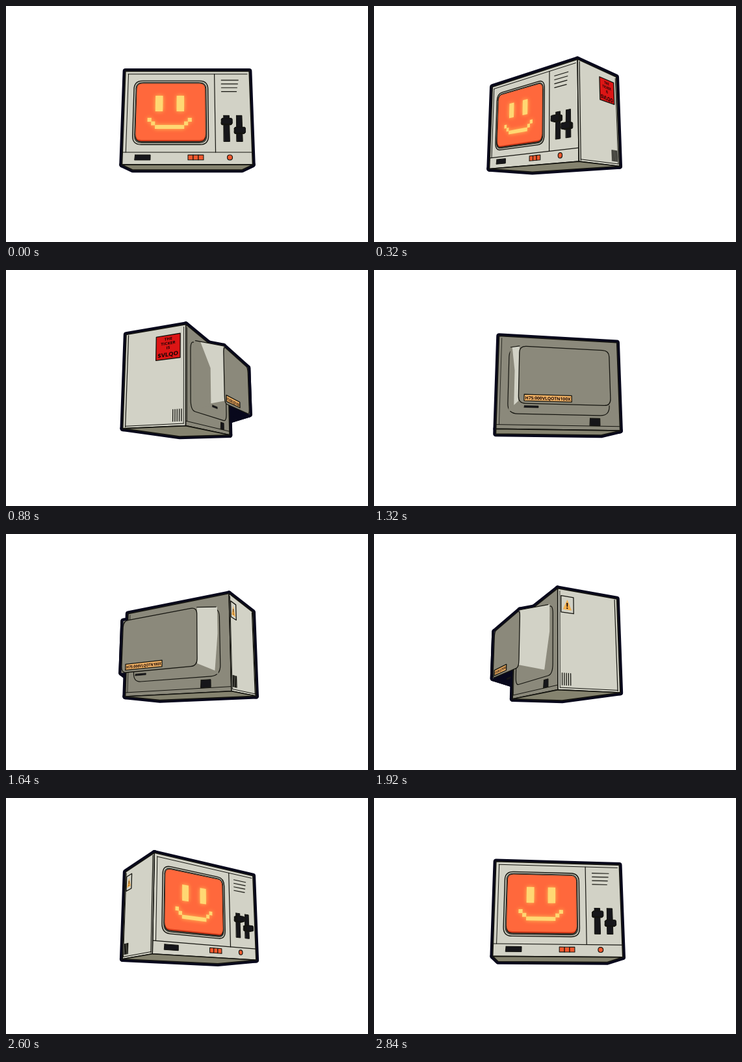
Write an HTML page with a canvas that moves like this. It is 557 by 363 pixels and loops after 2880 ms.

```html
<!DOCTYPE html>
<html lang="en">
<head>
<meta charset="utf-8">
<title>Turning monitor</title>
<style>
html, body { margin: 0; width: 100%; height: 100%; overflow: hidden; background: #fff; }
canvas { display: block; }
</style>
</head>
<body>
<canvas id="stage" width="557" height="363"></canvas>
<script>
const ctx = document.getElementById('stage').getContext('2d');
const LOOP = 2880, STEP = 40;
const INK = '#08081c', LINE = '#14140f', BLACK = '#16161a';
const LIGHT = '#d2d2c6', DARK = '#8b897b', UNDER = '#85836f';
const ORANGE = '#ff683c', GLOW = '#ffd873', KEY = '#f4592f';

// Camera looking up at the body; sizes in stage pixels at the turning axis
const CX = 279, CY = 182.5, D = 540, SP = 0.2, CP = Math.sqrt(1 - SP * SP);
const W = 88, H = 66.3, FRONT = 55, BACK = -38, TAIL = -80;

let sin = 0, cos = 1;

// One full turn, running slightly ahead halfway round
function setTurn(part) {
  const yaw = 2 * Math.PI * part + 0.096 * Math.sin(Math.PI * part);
  sin = Math.sin(yaw);
  cos = Math.cos(yaw);
}

function project([x, y, z]) {
  const depth = x * sin + z * cos;
  const k = D / (D - depth * CP + y * SP);
  return [CX + (x * cos - z * sin) * k, CY - (y * CP + depth * SP) * k];
}

// Flat coordinates on each side: u to the right, v up
const onFront = (u, v) => [u, v, FRONT];
const onRight = (u, v) => [W, v, -u];
const onLeft = (u, v) => [-W, v, u];
const onBack = (u, v) => [-u, v, BACK];
const onTail = (u, v) => [-u, v, TAIL];
const onSlope = (u, v) => [-u, v, -60];
const onKnob = out => (u, v) => [u, v, FRONT + out];

const mix = (p, q, t) => p.map((n, i) => n + (q[i] - n) * t);
const box = (at, l, r, top, low) => [at(l, top), at(r, top), at(r, low), at(l, low)];
const rect = (at, u, v, w, h) => box(at, u - w / 2, u + w / 2, v + h / 2, v - h / 2);

// Corners run clockwise as seen from outside
const body = {
  front: box(onFront, -W, W, H, -H),
  right: box(onRight, -FRONT, -BACK, H, -H),
  back: box(onBack, -W, W, H, -H),
  left: box(onLeft, BACK, FRONT, H, -H),
  under: box((x, z) => [x, -H, z], -W, W, FRONT, BACK)
};
const base = box(onBack, -73, 73, 50, -45);
const tail = box(onTail, -61, 61, 39, -37);

// A side of the hump spans two neighbouring corners, from base (0) to tail (1)
const slope = (i, j) => (u, v) => mix(mix(base[i], tail[i], u), mix(base[j], tail[j], u), v);
const humpRight = slope(0, 3), humpLeft = slope(1, 2), humpUnder = slope(3, 2);
const hump = [
  box(humpRight, 0, 1, 0, 1),
  box(humpLeft, 1, 0, 0, 1),
  box((u, v) => humpUnder(v, u), 1, 0, 0, 1).reverse()
];

function facing(poly) {
  const [a, b, c] = poly.map(project);
  return (b[0] - a[0]) * (c[1] - a[1]) - (b[1] - a[1]) * (c[0] - a[0]) > 0;
}

// Corners are rounded in model space, so that they shorten with the turn
function trace(poly, r) {
  ctx.beginPath();
  poly.forEach((p, i) => {
    const toward = q => project(mix(p, q, r / Math.hypot(...q.map((n, j) => n - p[j]))));
    if (!r) return ctx.lineTo(...project(p));
    ctx.lineTo(...toward(poly.at(i - 1)));
    ctx.quadraticCurveTo(...project(p), ...toward(poly[(i + 1) % poly.length]));
  });
  ctx.closePath();
}

function shape(poly, fill, width = 0, r = 0, stroke = LINE) {
  trace(poly, r);
  ctx.fillStyle = fill;
  ctx.fill();
  if (!width) return;
  ctx.strokeStyle = stroke;
  ctx.lineWidth = width;
  ctx.stroke();
}

function line(p, q, width = 1.2) {
  ctx.beginPath();
  ctx.moveTo(...project(p));
  ctx.lineTo(...project(q));
  ctx.strokeStyle = LINE;
  ctx.lineWidth = width;
  ctx.stroke();
}

// Draws flat artwork of w by h units on a projected rectangle
function decal(poly, w, h, draw) {
  const [o, x, , y] = poly.map(project);
  ctx.save();
  ctx.transform((x[0] - o[0]) / w, (x[1] - o[1]) / w, (y[0] - o[0]) / h, (y[1] - o[1]) / h, o[0], o[1]);
  ctx.textAlign = 'center';
  draw();
  ctx.restore();
}

function write(text, x, y, size) {
  ctx.fillStyle = '#140505';
  ctx.font = `bold ${size}px "Open Sans", sans-serif`;
  ctx.fillText(text, x, y);
}

function drawSmile() {
  const dot = (u, v, w, h) => shape(rect(onFront, u - 24.5, v, w, h), GLOW);
  ctx.save();
  ctx.shadowColor = '#ffc45a';
  ctx.shadowBlur = 6;
  dot(0, -14.4, 40.4, 5.5);
  for (const side of [-1, 1]) {
    dot(side * 14.8, 19, 10.4, 22.5);
    for (const i of [0, 1]) dot(side * (22.8 + 5.1 * i), -9.5 + 5.2 * i, 5.5, 5.5);
  }
  ctx.restore();
}

function drawScreen() {
  const ring = (inset, fill, width, lift = 0) =>
    shape(box(onFront, -75 + inset, 29 - inset, 52 - inset, -39 + inset + lift), fill, width, 12 - inset);
  ring(0, '#c3c3b6', 1.4);
  ring(2.5, '#96958a', 1);
  ring(4, '#d43c1c', 1.4);
  ring(4, ORANGE, 0, 2.5);
  drawSmile();
}

function drawFront() {
  line(onFront(38.4, 62), onFront(38.4, -49.5));
  line(onFront(-W, -49.5), onFront(W, -49.5));
  line(onFront(-83.5, 62), onFront(-83.5, -49.5), 1);
  line(onFront(-84, 62), onFront(W - 3, 62), 1);
  drawScreen();
  for (let i = 0; i < 4; i++) line(onFront(48, 53 - 5.6 * i), onFront(72 - i, 53 - 5.6 * i));
  shape(rect(onFront, -60.6, -56.5, 21, 7), BLACK, 1);
  for (let i = 0; i < 3; i++) shape(rect(onFront, 4.4 + 7 * i, -56.5, 7, 6.8), KEY, 1.1);
  shape(rect(onFront, 57.6, -56.5, 7, 7), KEY, 1.2, 3.5);
  for (let i = 0; i < 2; i++) {
    shape(rect(onFront, 54 + 17.6 * i, -16.5, 8, 36.5), BLACK, 1);
    for (let out = 0; out <= 6; out += 2)
      shape(rect(onKnob(out), 54 + 17.6 * i, -7.5 - 12.4 * i, 14.6, 8), BLACK, 1, 1.5);
  }
}

// Bevel lines and vents; dir points from the front edge to the back edge
function drawSide(at, dir) {
  const edge = -dir * (FRONT - 4), rear = -dir * (BACK + 3);
  line(at(edge, H - 2), at(edge, 2 - H));
  line(at(edge, 3 - H), at(rear, 3 - H), 1);
  line(at(rear, H - 3), at(rear, 3 - H), 0.9);
  for (let i = 0; i < 5; i++) line(at(dir * (20 + 3 * i), -45), at(dir * (20 + 3 * i), -60), 1.3);
}

function drawRight() {
  const note = rect(onRight, 12, 38.8, 36, 33);
  drawSide(onRight, 1);
  shape(note, '#dc1515', 1.3);
  decal(note, 37, 40, () => {
    ['THE', 'TICKER', 'IS'].forEach((word, i) => write(word, 18.5, 8.5 + 7.5 * i, 6.5));
    write('$VLQO', 18.5, 36, 9.5);
  });
}

function drawLeft() {
  const sign = rect(onLeft, -24, 46, 18.5, 22.5);
  drawSide(onLeft, -1);
  shape(sign, LIGHT, 1.3);
  decal(sign, 20, 26, () => {
    ctx.beginPath();
    ctx.moveTo(10, 5);
    ctx.lineTo(17, 21);
    ctx.lineTo(3, 21);
    ctx.fillStyle = '#f6b04c';
    ctx.fill();
    write('!', 10, 19.5, 13);
  });
}

function drawBack() {
  line(onBack(-W, 6 - H), onBack(W, 6 - H), 1);
  line(onBack(4 - W, H - 3), onBack(4 - W, 6 - H), 0.8);
  shape(rect(onBack, 51, -54.5, 15, 10.5), BLACK, 1);
}

// Light falls on a hump side from the tail edge; cut keeps part of it in shade
function drawSlope(at, cut, seen) {
  shape(box(at, 0.1, 1, 0, 1), seen ? DARK : LIGHT);
  if (seen) shape([at(0.1 + cut * 0.4, 0), at(1, 0), at(1, 0.96), at(0.25 + cut * 0.7, 0.96), at(0.1 + cut, 0.4)], LIGHT);
  line(at(0.15, 0), at(1, 0));
}

function drawTail() {
  const tag = rect(onTail, -22.8, -29.4, 62, 8.4);
  shape(tail, DARK);
  shape(tail, DARK, 1.3, 9);
  shape(tag, '#f3b365', 1.3);
  decal(tag, 74, 10, () => write('H75:000VLQOTN100X', 37, 7.8, 6.8));
  shape(rect(onSlope, -42.5, -38, 19, 2.5), BLACK, 0.6);
}

function drawHump() {
  const seen = facing(base);
  if (seen) shape(base, DARK, 1.2, 14);
  if (facing(hump[2])) shape(box((u, v) => humpUnder(v, u), 0, 1, 0.1, 1), DARK);
  if (facing(hump[0])) drawSlope(humpRight, 0.5, seen);
  if (facing(hump[1])) drawSlope(humpLeft, 0, seen);
  if (facing(tail)) drawTail();
}

const fills = { back: DARK, under: UNDER };
const details = { front: drawFront, right: drawRight, left: drawLeft, back: drawBack };

function drawBody() {
  for (const [name, poly] of Object.entries(body)) {
    if (!facing(poly)) continue;
    shape(poly, fills[name] || LIGHT, 1.6);
    if (details[name]) details[name]();
  }
}

function draw(t) {
  ctx.fillStyle = '#fff';
  ctx.fillRect(0, 0, 557, 363);
  ctx.lineJoin = ctx.lineCap = 'round';
  setTurn(t / LOOP);
  const outline = poly => shape(poly, INK, 8.5, 0, INK);
  Object.values(body).filter(facing).forEach(outline);
  hump.forEach(outline);
  outline(tail);
  const order = facing(body.back) ? [drawBody, drawHump] : [drawHump, drawBody];
  order.forEach(part => part());
}

const start = performance.now();
function tick(now) {
  draw(Math.floor(Math.max(0, now - start) % LOOP / STEP) * STEP);
  requestAnimationFrame(tick);
}
draw(0);
requestAnimationFrame(tick);
</script>
</body>
</html>
```
